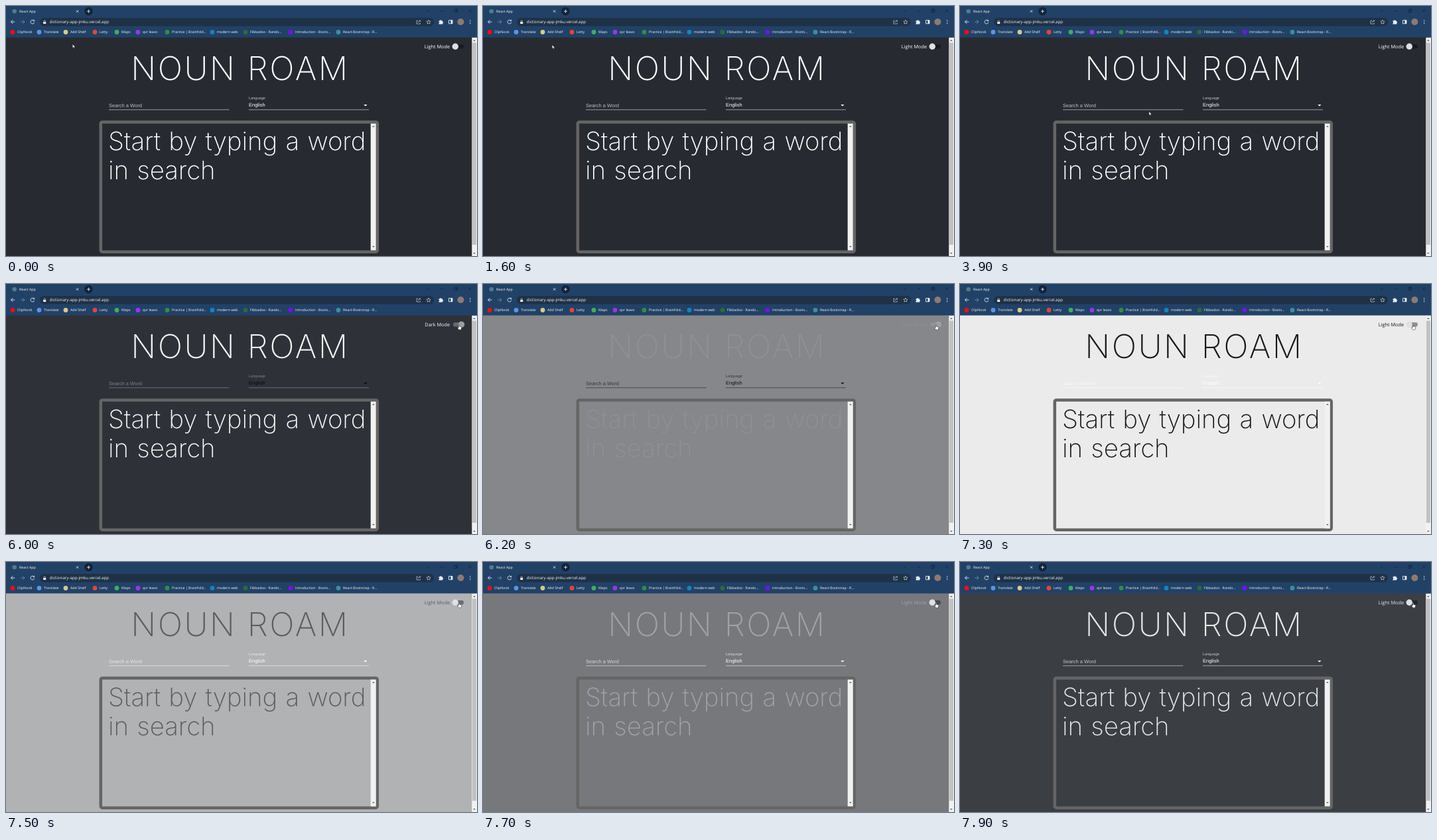
These frames come from a looping animation (710 by 378 pixels, 8 s). An HTML page:

```html
<!DOCTYPE html>
<html lang="en">
<head>
<meta charset="utf-8">
<title>Dictionary</title>
<style>
  html, body { margin: 0; width: 100%; height: 100%; overflow: hidden; background: #272b31; }
  svg { display: block; width: 100%; height: 100%; text-rendering: geometricPrecision; }
  .ui { font: 5.3px "Open Sans", "Noto Sans", sans-serif; fill: #f4f7fb; }
  .thin { font-family: Inter, Lato, sans-serif; font-weight: 150; }
  .form { font: 7.5px "Liberation Sans", Arial, sans-serif; }
  .line { fill: none; stroke: #e4ebf4; stroke-width: .9; }
</style>
</head>
<body>
<svg viewBox="0 0 710 378" preserveAspectRatio="none">
  <!-- page -->
  <rect id="page" y="47" width="710" height="331"/>
  <g id="ink">
    <text id="mode" x="669" y="63.5" text-anchor="end" style="font:7.3px 'Open Sans','Noto Sans',sans-serif"></text>
    <text class="thin" x="353" y="112" font-size="49.5" letter-spacing="2.5" text-anchor="middle">NOUN ROAM</text>
    <g class="thin" font-size="38.5" letter-spacing="-.1" word-spacing="1.6">
      <text x="154" y="218">Start by typing a word</text>
      <text x="154" y="261.5">in search</text>
    </g>
  </g>
  <g id="label" class="form">
    <text x="155" y="152.7">Search a Word</text>
    <text x="366" y="141" style="font-size:5.6px">Language</text>
    <path d="M155 156.5h181.500v.8H155zM366 156.5h181v.8H366z"/>
  </g>
  <g id="value" class="form">
    <text x="366" y="152.2">English</text>
    <path d="M539.3 149h5.200l-2.600 2.600z"/>
  </g>
  <rect id="track" x="674" y="58" width="16" height="6.5" rx="3.25"/>
  <circle id="thumb" cy="61.3" r="4.7"/>

  <!-- card and scrollbars -->
  <rect x="142.8" y="175.4" width="417" height="196.3" rx="2.5" fill="none" stroke="#656565" stroke-width="4.5"/>
  <path d="M549.7 177.700h8v191.700h-8zM702.300 47.500h8v331h-8z" fill="#f1f1f1"/>
  <path d="M703 55.500h6v305.500h-6z" fill="#c1c1c1"/>
  <path d="M552 183l1.900-2 1.900 2zM552 363l1.900 2 1.900-2zM704 53l1.900-2 1.900 2zM704 373l1.900 2 1.900-2z" fill="#606060"/>

  <!-- browser -->
  <rect width="710" height="47.5" fill="#224166"/>
  <rect x="51" y="18" width="594" height="12.6" rx="6.3" fill="#1e3147"/>
  <circle cx="124.500" cy="8" r="6.2" fill="#12233a"/>
  <circle cx="12.7" cy="8" r="3.3" fill="#4f7d8a"/>
  <circle cx="685.4" cy="24" r="5" fill="#8d7a70"/>
  <path class="line" d="M106 6.400l3.200 3.200m0-3.200l-3.200 3.200M122 8h5m-2.500-2.500v5M13.300 24H7.500m2.800-2.800L7.500 24l2.800 2.800M42.300 22.300a2.900 2.900 0 1 0 .5 2.400m-.2-3.900v2h-2"/>
  <path class="line" opacity=".4" d="M22.200 24H28m-2.800-2.800L28 24l-2.800 2.800"/>
  <path class="line" style="stroke-width:.6" d="M621 22h-2v5h5.500v-1.500M621 25q.4-2.600 3.800-2.600m-1.500-1.500l1.500 1.500-1.500 1.500M637 21l.9 2.100 2.300.2-1.700 1.500.5 2.300-2-1.200-2 1.200.5-2.300-1.700-1.500 2.300-.2zM57 24v-1q0-1.200 1.200-1.200T59.400 23v1"/>
  <path class="line" d="M667.500 21.500h5.500v5.200h-5.500z"/>
  <path fill="#e9eef5" d="M670.500 21.500h2.500v5h-2.500zM652.500 22.300h1.700a1.100 1.100 0 0 1 2.200 0h1.700v1.700a1.100 1.100 0 0 1 0 2.200v1.200h-5.600v-1.500a1.100 1.100 0 0 0 0-2.100zM56.200 24h4v3h-4z"/>
  <path class="line" style="stroke-width:1.4;stroke-linecap:round;stroke-dasharray:0 2.400" d="M699.700 21.700v5"/>
  <path class="line" style="stroke:#10213a;stroke-width:.7" d="M633.500 6.300l2 1.800 2-1.800M655 7.500h4.500M675.800 6h3.600v3.600h-3.600zM677 6v-1.200h3.600v3.600h-1.200M697.200 5l4 4m0-4l-4 4"/>
  <g class="ui" id="bar">
    <text x="20" y="9.9">React App</text>
    <text x="65.8" y="26.3" style="font-size:6.2px">dictionary-app-jmku.vercel.app</text>
  </g>

  <!-- pointers, drawn with the hot spot at 0,0 -->
  <path id="arrow" d="M0 0v5.600l1.300-1.200.9 2 1-.4-.9-1.900h1.800z" fill="#fff" stroke="#111" stroke-width=".45"/>
  <path id="hand" d="M-.7 .7q.7-1 1.400 0v2.500l2.400.5q.8.200.7 1l-.5 2.700q-.2.800-.9.800H.1q-.6 0-1-.6L-2.500 5q.4-1 1.800 0z" fill="#fff" stroke="#111" stroke-width=".5"/>
</svg>
<script>
const $ = id => document.getElementById(id);

function set(el, attrs) {
  for (const k in attrs) el.setAttribute(k, attrs[k]);
}
function add(tag, attrs, text = "") {
  const el = document.createElementNS("http://www.w3.org/2000/svg", tag);
  set(el, attrs);
  el.textContent = text;
  $("bar").append(el);
}

// bookmarks: text start, icon colour, title
[
  [17, "#f00c18", "ClipNook"],
  [57, "#5b94e8", "Translate"],
  [97, "#d9c98a", "Add Shelf"],
  [141, "#e0463a", "Letty"],
  [174, "#3fae5c", "Maps"],
  [206, "#9a35ee", "qvr leavo"],
  [250, "#2f8d46", "Practice | Brainfold..."],
  [318, "#1583bd", "modern web"],
  [368, "#2c6b3c", "Fibbadoo - Rando..."],
  [436, "#7312f0", "Introduction - Boots..."],
  [508, "#3d8e9c", "React-Bootstrap - R..."]
].forEach(([x, fill, title]) => {
  add("circle", { cx: x - 7, cy: 39.5, r: 3.4, fill });
  add("text", { x, y: 41.4 }, title);
});

const ramp = (t, from, to) => Math.min(1, Math.max(0, (t - from) / (to - from)));
const gray = v => `rgb(${[v, v, v].map(Math.round)})`;

// pointer moves: begin, end, destination
const home = [100.3, 57.8];
const moves = [
  [1500, 1900, 116, 62],
  [2000, 2600, 181, 142],
  [2700, 3100, 403, 298],
  [3200, 3700, 236, 168],
  [3800, 4700, 676, 92],
  [4700, 5200, 683, 61]
];

function pointer(t) {
  return moves.reduce(([x, y], [from, to, toX, toY]) => {
    const f = ramp(t, from, to);
    return [x + (toX - x) * f, y + (toY - y) * f];
  }, home);
}

function draw(now) {
  const t = Math.floor(now % 8000 / 100) * 100;
  const light = t >= 6000 && t < 7100;
  const fade = ramp(t, 5983, 6483) - ramp(t, 7230, 7970);
  const fieldFade = ramp(t, 5930, 6130) - ramp(t, 7000, 7200);

  const page = [39, 43, 49].map(c => Math.round(c + (255 - c) * fade));
  set($("page"), { fill: `rgb(${page})` });
  set($("ink"), { fill: gray(255 * (1 - fade)) });
  set($("label"), { fill: gray(255 * (1 - fieldFade)), "fill-opacity": .7 - .1 * fieldFade });
  set($("value"), { fill: light ? "#000" : "#fff", "fill-opacity": light ? .87 : 1 });

  $("mode").textContent = light ? "Dark Mode" : "Light Mode";
  set($("track"), { fill: light ? "#9e9e9e" : "#000", opacity: light ? .5 : .38 });
  set($("thumb"), { cx: light ? 686.5 : 677.3, fill: light ? "#9e9e9e" : "#e0e0e0" });

  const over = t >= 5200, transform = `translate(${pointer(t)})`;
  set($("arrow"), { transform, visibility: over ? "hidden" : "visible" });
  set($("hand"), { transform, visibility: over ? "visible" : "hidden" });
}

const start = performance.now();
function loop() {
  draw(performance.now() - start);
  requestAnimationFrame(loop);
}
loop();
</script>
</body>
</html>
```
